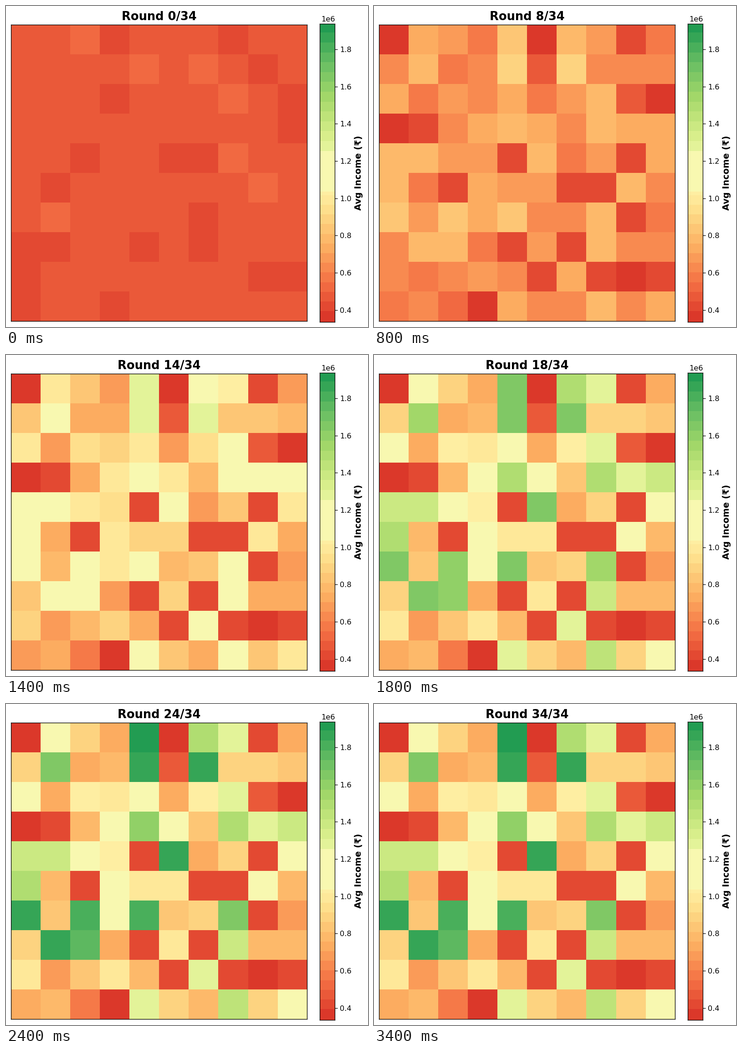
Write a matplotlib script that moves like this. It is 795 px wide and 704 px high and loops after 3.5 s.

```python
import numpy as np
import matplotlib.pyplot as plt
from matplotlib.animation import FuncAnimation
from matplotlib.colors import ListedColormap

W, H, DPI = 795, 704, 128
ROUNDS = 34
LO, HI = 33.6, 193.8    # colour range, in units of 10,000

plt.rcParams["font.family"] = "DejaVu Sans"

# The income each cell ends up with
FINAL = np.array([
    [38, 115, 90, 72, 192, 36, 152, 128, 42, 72],
    [90, 163, 73, 78, 187, 47, 187, 90, 90, 84],
    [115, 72, 102, 97, 115, 72, 102, 128, 47, 36],
    [36, 42, 77, 115, 158, 115, 84, 152, 128, 137],
    [137, 137, 115, 102, 42, 187, 72, 90, 42, 115],
    [152, 77, 42, 115, 97, 97, 42, 42, 115, 77],
    [187, 84, 179, 115, 182, 84, 90, 163, 42, 67],
    [90, 187, 174, 72, 42, 97, 42, 137, 77, 77],
    [97, 67, 84, 97, 77, 42, 128, 42, 38, 42],
    [72, 77, 57, 36, 128, 90, 77, 142, 90, 115]], float)

# Everyone starts nearly equal; the poor settle fast, the rich grow longest
rng = np.random.default_rng(4)
START = rng.choice([42, 47, 52], p=[0.25, 0.7, 0.05], size=FINAL.shape)
GROWTH_TIME = np.where(FINAL < 47, 5, 12 + FINAL / 24)


def incomes(n):
    """Steady exponential growth from the start to the final income."""
    share = np.minimum(n / GROWTH_TIME, 1)
    return START * (FINAL / START) ** share


def banded_cmap():
    """Inner part of RdYlGn in even bands, with one wide pale one."""
    edges = np.r_[39.4:103:5.2, 103.8, 125.6:190:5.3]
    ramp = plt.get_cmap("RdYlGn", 2048)(np.linspace(0.1, 0.9, 1602))
    band = np.digitize(np.linspace(LO, HI, len(ramp)), edges)
    for b in range(len(edges) + 1):
        ramp[band == b] = ramp[band == b].mean(axis=0)
    return ListedColormap(ramp)


def pt(px):
    return px * 72 / DPI


fig = plt.figure(figsize=(W / DPI, H / DPI), dpi=DPI, facecolor="white")


def panel(x, y, w, h):
    ax = fig.add_axes([x / W, 1 - (y + h) / H, w / W, h / H])
    for spine in ax.spines.values():
        spine.set_linewidth(pt(1.3))
    return ax


def label(x, y, s, px, **kw):
    return fig.text(x / W, 1 - y / H, s, fontsize=pt(px), ha="center",
                    va="baseline", rotation_mode="anchor", **kw)


style = dict(cmap=banded_cmap(), vmin=LO, vmax=HI, aspect="auto",
             interpolation="nearest")

ax = panel(11.1, 40.9, 650.1, 650)
ax.set(xticks=[], yticks=[])
heat = ax.imshow(incomes(0), **style)

bar = panel(689.1, 38.8, 33, 654)
bar.imshow(np.linspace(LO, HI, 1308)[:, None], origin="lower",
           extent=(0, 1, LO, HI), **style)
ticks = range(40, 181, 20)
bar.set_xticks([])
bar.set_yticks(ticks, [f"{t / 100:.1f}" for t in ticks])
bar.yaxis.tick_right()
bar.tick_params(labelsize=pt(16.1), length=pt(5.6), width=pt(1.3),
                pad=pt(5.6))

label(707, 33.5, "1e6", 16.1)
label(780, 365.8, "Avg Income (₹)", 19.3, weight="bold", rotation=90)
title = label(336.1, 31, "", 25.8, weight="bold")


def update(n):
    heat.set_data(incomes(n))
    title.set_text(f"Round {n}/{ROUNDS}")
    return heat, title


anim = FuncAnimation(fig, update, frames=ROUNDS + 1, interval=100,
                     repeat=True, repeat_delay=0, blit=False)
plt.show()
```
